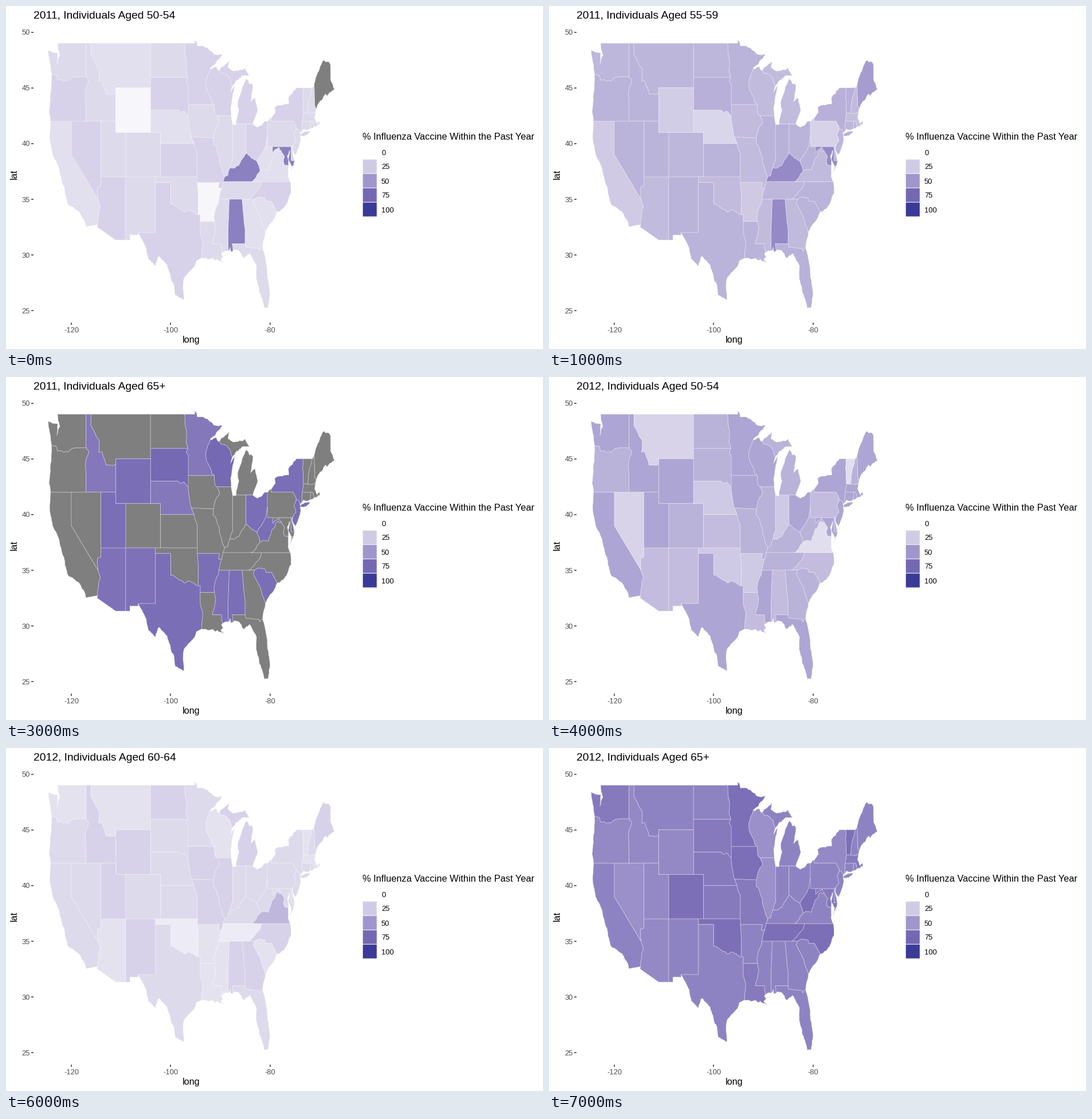
Animation of 937x598 px, one loop 8 s. Source, as a matplotlib script:

```python
import numpy as np
import matplotlib.pyplot as plt
from matplotlib.animation import FuncAnimation
from matplotlib.patches import PathPatch, Rectangle
from matplotlib.path import Path

W, H, DPI = 937, 598, 72  # at 72 dpi one point is one pixel
plt.rcParams["font.family"] = "Liberation Sans"
NA = np.nan
LEVELS = [0, 25, 50, 75, 100]
COLORS = ["#ffffff", "#d0cbe5", "#a096cc", "#7568b3", "#3a3a98"]
SHADES = np.array([plt.matplotlib.colors.to_rgb(c) for c in COLORS])

rng = np.random.default_rng(4)
arcs = []


def to_px(lon, lat):
    return 114 + (lon + 120) * 8.6625, 45.5 + (50 - lat) * 19.42


def ragged(a, b):
    """Midpoint displacement from a up to, but without, b."""
    d = b - a
    size = np.hypot(*d)
    if size < 0.3 or min(abs(d)) < 0.03:
        return [a]
    normal = np.array([-d[1], d[0]]) / size
    mid = (a + b) / 2 + normal * rng.normal(0, 0.07) * min(size, 1)
    return ragged(a, mid) + ragged(mid, b)


def straight(owners, *coords):
    """Border shared by the owners, as west longitude, latitude pairs."""
    points = np.reshape(coords, (-1, 2)) * [-1.0, 1.0]
    arcs.append((owners.split(), points))


def natural(owners, *coords):
    """River or coast through a few key points."""
    straight(owners, *coords)
    p = arcs.pop()[1]
    line = [q for a, b in zip(p, p[1:]) for q in ragged(a, b)]
    arcs.append((owners.split(), np.array(line + [p[-1]])))


def parallel(lat, *stops):
    """Borders along one latitude: longitude, owners, longitude, ..."""
    for w0, owners, w1 in zip(stops[::2], stops[1::2], stops[2::2]):
        straight(owners, w0, lat, w1, lat)


def meridian(lon, *stops):
    """Borders along one longitude: latitude, owners, latitude, ..."""
    for n0, owners, n1 in zip(stops[::2], stops[1::2], stops[2::2]):
        straight(owners, lon, n0, lon, n1)


def gap(a, b):
    return np.hypot(*(a - b))


def rings(state):
    """Chain the borders of a state into closed rings."""
    parts = [line for owners, line in arcs if state in owners]
    done = []
    while parts:
        ring = parts.pop(0)
        while parts:
            options = [(gap(ring[-1], p[0]), i, 1) for i, p in enumerate(parts)]
            options += [(gap(ring[-1], p[-1]), i, -1) for i, p in enumerate(parts)]
            dist, i, step = min(options)
            if gap(ring[-1], ring[0]) <= dist:
                break
            ring = np.vstack([ring, parts.pop(i)[::step][1:]])
        done.append(np.vstack([ring, ring[:1]]))
    return done


# Surveyed grid
parallel(49, 122.75, "WA", 117.05, "ID", 116.05, "MT", 104.05, "ND", 97.2)
parallel(45.94, 104.05, "ND SD", 96.55)
parallel(45, 111.05, "MT WY", 104.05)
parallel(45, 73.35, "VT", 71.5)
parallel(43.5, 96.45, "MN IA", 91.2)
parallel(43, 104.05, "NE SD", 98.5)
parallel(42.5, 90.65, "WI IL", 87.8)
parallel(42, 124.2, "OR CA", 120, "OR NV", 117.05, "ID NV", 114.05, "ID UT", 111.05)
parallel(42, 79.75, "PA NY", 75.35)
parallel(42, 73.5, "CT MA", 71.8, "RI MA", 71.4)
parallel(41.75, 86.8, "MI IN", 84.82, "MI OH", 83.45)
parallel(41, 111.05, "WY UT", 109.05, "WY CO", 104.05, "NE CO", 102.05)
parallel(41, 73.9, "NY", 73.65)
parallel(40, 102.05, "NE KS", 95.3)
parallel(39.72, 80.52, "PA WV", 79.48, "PA MD", 75.75)
parallel(38.45, 75.75, "MD DE", 75.05)
parallel(37, 114.05, "UT AZ", 109.05, "CO NM", 103.05, "CO OK", 102.05, "KS OK", 94.62)
parallel(36.58, 89.45, "KY TN", 83.7, "TN VA", 81.7, "NC VA", 75.87)
parallel(36.5, 103.05, "OK TX", 100)
parallel(36.5, 94.62, "MO AR", 90.15)
parallel(35, 90.3, "MS TN", 88.2, "AL TN", 85.6, "GA TN", 84.3, "GA NC", 83.1)
parallel(33, 94.05, "AR LA", 91.15)
parallel(32, 106.6, "NM TX", 103.05)
parallel(31, 91.6, "LA MS", 89.75)
parallel(31, 87.6, "AL FL", 85)
meridian(117.05, 46, "WA ID", 49)
meridian(117.05, 42, "OR ID", 43.8)
meridian(116.05, 48, "ID MT", 49)
meridian(114.05, 36.2, "NV AZ", 37, "NV UT", 42)
meridian(111.05, 41, "WY UT", 42, "ID WY", 44.5, "MT WY", 45)
meridian(109.05, 31.33, "AZ NM", 37, "UT CO", 41)
meridian(104.05, 41, "NE WY", 43, "SD WY", 45, "MT SD", 45.94, "MT ND", 49)
meridian(103.05, 32, "NM TX", 36.5, "NM OK", 37)
meridian(102.05, 37, "CO KS", 40, "NE CO", 41)
meridian(100, 34.55, "OK TX", 36.5)
meridian(96.45, 42.5, "IA SD", 43.5)
meridian(94.62, 36.5, "MO OK", 37, "KS MO", 39.1)
meridian(94.05, 31.9, "TX LA", 33, "TX AR", 33.6)
meridian(87.53, 39.35, "IL IN", 41.7)
meridian(84.82, 39.1, "IN OH", 41.75)
meridian(80.52, 39.72, "PA WV", 40.64, "OH PA", 42)
meridian(79.75, 42, "PA NY", 42.27)
meridian(75.75, 38.45, "MD DE", 39.72)

# Other straight borders
straight("CA NV", 120, 42, 120, 39, 114.63, 35)
straight("CA", 114.72, 32.72, 117.1, 32.53)
straight("AZ", 114.72, 32.72, 114.8, 32.5, 111.07, 31.33, 109.05, 31.33)
straight("NM", 109.05, 31.33, 108.2, 31.33, 108.2, 31.78, 106.5, 31.78, 106.6, 32)
straight("OK AR", 94.62, 36.5, 94.43, 35.4, 94.48, 33.6)
straight("TX AR", 94.48, 33.6, 94.05, 33.6)
straight("IA MO", 95.85, 40.58, 91.4, 40.5)
straight("MS AL", 88.4, 30.35, 88.45, 31.9, 88.2, 35)
straight("AL GA", 85, 31, 85, 32.3, 85.18, 32.85, 85.6, 35)
straight("SC NC", 83.1, 35, 82.3, 35.2, 81, 35.1, 80.8, 34.8, 79.7, 34.8, 78.55, 33.86)
straight("GA FL", 85, 31, 84.86, 30.7, 82.2, 30.57, 82.05, 30.36, 81.45, 30.72)
straight("PA DE", 75.75, 39.72, 75.42, 39.8)
straight("MD VA", 75.65, 37.95, 75.25, 38.03)
straight("VT MA", 73.25, 42.75, 72.45, 42.73)
straight("NY CT", 73.65, 41, 73.5, 42)
straight("NY MA", 73.5, 42, 73.25, 42.75)
straight("CT RI", 71.8, 42, 71.86, 41.32)
straight("NH MA", 72.45, 42.73, 71.3, 42.7, 70.8, 42.87)
straight("NH ME", 71.1, 45.3, 70.98, 43.4, 70.7, 43.07)

# Rivers and ridges
natural("WA OR", 124, 46.25, 123.1, 46.15, 122.8, 45.7, 121.2, 45.65, 119, 46, 117.05, 46)
natural("OR ID", 117.05, 46, 116.5, 45.6, 117.2, 44.4, 117.05, 43.8)
natural("CA AZ", 114.63, 35, 114.15, 34.3, 114.55, 33.5, 114.72, 32.72)
natural("NV AZ", 114.05, 36.2, 114.7, 36.1, 114.63, 35)
natural("ID MT", 111.05, 44.5, 113, 44.45, 113.9, 45.65, 114.5, 45.6, 114.35, 46.6,
        116.05, 48)
natural("OK TX", 100, 34.55, 98.1, 34.1, 97.2, 33.85, 95.5, 33.9, 94.48, 33.6)
natural("NE SD", 98.5, 43, 97.9, 42.8, 97, 42.75, 96.45, 42.5)
natural("NE IA", 96.45, 42.5, 95.85, 40.58)
natural("NE MO", 95.85, 40.58, 95.3, 40)
natural("KS MO", 95.3, 40, 95.05, 39.5, 94.62, 39.1)
natural("TX LA", 94.05, 31.9, 93.55, 31.2, 93.84, 29.7)
natural("TX", 97.3, 25.97, 99.1, 26.4, 99.5, 27.5, 100.7, 29.1, 102.3, 29.87,
        103.1, 29, 104.5, 29.65, 104.9, 30.6, 106.6, 32)
natural("MN ND", 97.2, 49, 96.8, 46.9, 96.55, 45.94)
natural("MN SD", 96.55, 45.94, 96.85, 45.6, 96.45, 45.3, 96.45, 43.5)
natural("MN WI", 92.05, 46.7, 92.9, 45.6, 92.75, 44.8, 91.2, 43.5)
natural("WI IA", 91.2, 43.5, 91.1, 42.7, 90.65, 42.5)
natural("WI MI", 87.6, 45.1, 88.1, 45.9, 90.4, 46.55)
natural("IL IN", 87.53, 39.35, 87.5, 38.5, 88.05, 37.8)
natural("IL IA", 90.65, 42.5, 90.15, 41.9, 91.05, 41.2, 91.4, 40.5)
natural("IL MO", 91.4, 40.5, 91.4, 39.9, 90.2, 38.8, 90.2, 38.4, 89.15, 37)
natural("IL KY", 89.15, 37, 88.5, 37.1, 88.05, 37.8)
natural("IN KY", 88.05, 37.8, 86.3, 38, 84.82, 39.1)
natural("OH KY", 84.82, 39.1, 83.7, 38.65, 82.6, 38.4)
natural("OH WV", 80.52, 40.64, 80.85, 39.7, 81.8, 38.95, 82.6, 38.4)
natural("KY WV", 82.6, 38.4, 81.97, 37.54)
natural("KY VA", 81.97, 37.54, 83.7, 36.58)
natural("KY MO", 89.45, 36.58, 89.15, 37)
natural("MO TN", 89.45, 36.58, 89.7, 36)
natural("MO AR", 90.15, 36.5, 90.37, 36, 89.7, 36)
natural("AR TN", 89.7, 36, 90.3, 35)
natural("AR MS", 90.3, 35, 91.1, 33.9, 91.15, 33)
natural("LA MS", 91.15, 33, 90.9, 32.4, 91.6, 31)
natural("LA MS", 89.75, 31, 89.55, 30.2)
natural("AL FL", 87.45, 30.3, 87.6, 31)
natural("TN NC", 84.3, 35, 82, 36.1, 81.7, 36.58)
natural("GA SC", 83.1, 35, 83.35, 34.7, 81.9, 33.4, 80.9, 32.05)
natural("PA NY", 75.35, 42, 74.7, 41.36)
natural("PA NJ", 75.42, 39.8, 74.75, 40.2, 75.15, 40.8, 74.7, 41.36)
natural("WV MD", 79.48, 39.72, 79.48, 39.2, 78.2, 39.66, 77.72, 39.32)
natural("WV VA", 77.72, 39.32, 78.35, 39.4, 79.7, 38.5, 80.3, 37.6, 81.97, 37.54)
natural("MD VA", 77.72, 39.32, 77.05, 38.8, 77.3, 38.4, 76.3, 37.95)
natural("NJ NY", 73.9, 41, 74.7, 41.36)
natural("NY VT", 73.25, 42.75, 73.4, 44, 73.35, 45)
natural("VT NH", 71.5, 45, 72.05, 44.1, 72.45, 42.73)
natural("RI MA", 71.4, 42, 71.12, 41.5)

# Coasts, lake shores and the northeastern frontier
natural("WA", 124, 46.25, 124.6, 47.9, 124.7, 48.4, 122.75, 48.15, 122.9, 47.1,
        122.3, 47.9, 122.75, 49)
natural("OR", 124.2, 42, 124.5, 42.85, 124, 46.25)
natural("CA", 117.1, 32.53, 117.3, 33, 118.4, 33.85, 120.6, 34.5, 121.9, 36.6,
        122.5, 37.8, 123.75, 38.95, 124.35, 40.4, 124.2, 42)
natural("TX", 93.84, 29.7, 94.8, 29.5, 97.3, 27.9, 97.5, 27, 97.3, 25.97)
natural("LA", 89.55, 30.2, 89.8, 30.1, 89.4, 29.8, 89.9, 29.6, 89.2, 29.2,
        90.2, 29.45, 91.6, 29.7, 92.3, 29.6, 93.84, 29.7)
natural("MS", 89.55, 30.2, 88.4, 30.35)
natural("AL", 88.4, 30.35, 88, 30.7, 87.85, 30.25, 87.45, 30.3)
natural("FL", 81.45, 30.72, 80.55, 28.4, 80.03, 26.8, 80.35, 25.25, 81.1, 25.2,
        81.85, 26.45, 82.75, 27.85, 82.7, 29, 84, 30.1, 85.3, 29.7, 86.3, 30.4,
        87.45, 30.3)
natural("GA", 80.9, 32.05, 81.45, 30.72)
natural("SC", 78.55, 33.86, 79.3, 33.1, 80.9, 32.05)
natural("NC", 75.87, 36.58, 75.75, 35.5, 76.5, 34.7, 77.9, 33.95, 78.55, 33.86)
natural("VA", 76.3, 37.95, 76.35, 37.1, 75.87, 36.58)
natural("VA", 75.25, 38.03, 75.95, 37.15, 75.65, 37.95)
natural("MD", 76.3, 37.95, 76.5, 38.9, 76, 39.4, 76.3, 38.6, 75.65, 37.95)
natural("MD", 75.25, 38.03, 75.05, 38.45)
natural("DE", 75.42, 39.8, 75.6, 39.5, 75.4, 39.1, 75.05, 38.45)
natural("NJ", 75.42, 39.8, 75.5, 39.5, 74.9, 38.95, 74.1, 39.8, 73.9, 41)
natural("NY", 74, 40.6, 73.7, 40.87, 72.3, 41.1, 71.9, 41.05, 72.5, 40.82, 74, 40.6)
natural("NY", 79.75, 42.27, 78.9, 42.8, 79.05, 43.27, 76.2, 43.55, 76.3, 44.1,
        74.7, 45, 73.35, 45)
natural("CT", 71.86, 41.32, 73.65, 41)
natural("RI", 71.12, 41.5, 71.86, 41.32)
natural("MA", 70.8, 42.87, 71, 42.3, 70.5, 41.78, 70, 42, 69.95, 41.7, 71.12, 41.5)
natural("NH", 71.5, 45, 71.1, 45.3)
natural("NH", 70.7, 43.07, 70.8, 42.87)
natural("ME", 71.1, 45.3, 70, 46.7, 69.23, 47.46, 68.3, 47.35, 67.8, 47.07,
        67.78, 45.7, 67, 44.85, 68.5, 44.25, 68.8, 44.45, 70.2, 43.6, 70.7, 43.07)
natural("PA", 80.52, 42, 79.75, 42.27)
natural("OH", 83.45, 41.75, 82.5, 41.45, 80.52, 42)
natural("IN", 87.53, 41.7, 86.8, 41.75)
natural("IL", 87.8, 42.5, 87.53, 41.7)
natural("MI", 86.8, 41.75, 86.25, 43, 86.5, 43.7, 85.6, 45, 84.8, 45.8, 83.4, 45.2,
        83.9, 43.75, 82.95, 44.07, 82.45, 43, 83.45, 41.75)
natural("MI", 90.4, 46.55, 88.2, 47.45, 88.45, 46.8, 87.4, 46.5, 85, 46.77,
        84.1, 46.1, 85.5, 46.1, 86.7, 45.7, 87.6, 45.1)
natural("WI", 87.8, 42.5, 87.9, 43.2, 87.5, 44.4, 87.1, 45.3, 87.95, 44.6, 87.6, 45.1)
natural("WI", 92.05, 46.7, 90.8, 46.9, 90.4, 46.55)
natural("MN", 97.2, 49, 95.15, 49, 95.15, 49.38, 94.6, 48.75, 92.9, 48.6,
        91.4, 48.07, 89.6, 48, 92.05, 46.7)

STATES = sorted({s for owners, _ in arcs for s in owners})


def rates(usual, groups):
    """One rate for most states, others for the groups that stand out."""
    special = {s: rate for rate, names in groups.items() for s in names.split()}
    return np.array([special.get(s, usual) for s in STATES])


young_11 = rates(18, {4.5: "WY AR", 15.5: "NE VA WV CA GA SC MT", 62: "KY AL MD",
                      21.5: "OR NV AZ SD KS MO MI OH NC TX NY MN WI", NA: "ME"})
older_11 = rates(51, {25: "NE PA", 35: "CA", 44: "WY AZ WI MI MO MA", 57: "FL SC WV VT IN",
                      47: "IA AR OK ME NH MS", 54: "ID MT UT NM SD LA IL NY"})
senior_11 = rates(NA, {66.5: "ID NE MN", 70: "AZ NM MS", 74.5: "SD WI",
                       72: "WY UT TX AR AL SC WV OH NY NJ DE"})
young_12 = rates(37, {16: "VT VA", 21: "NV MT", 26: "NE OK AR IN",
                      32: "AZ NM LA NC PA AL KS",
                      43: "WA ID WY UT TX MN IA WI OH MS FL NY NJ ME MA MD CT RI CA"})
older_12 = rates(18, {9.5: "OK TN", 14: "WA MT AZ AR LA WI MS SC VT MA", 34: "VA",
                      21.5: "ID WY UT ND IA IL MI AL GA NC ME MO NM"})
senior_12 = rates(60.5, {53: "NV WI IL", 57: "ID UT WY AZ OR NY",
                         65: "SD NE KS MO LA WA MA MD",
                         71: "CO IA TN NC WV VT OK MN"})
mid_11 = np.nanmean([young_11, older_11], axis=0)
steady = np.isin(STATES, ["WA", "OR", "CA", "TX", "FL", "LA"])
mid_12 = np.where(steady, young_12, (young_12 + 38) / 2)

AGES = ["50-54", "55-59", "60-64", "65+"]
RATES = [young_11, mid_11, older_11, senior_11,
         young_12, mid_12, older_12, senior_12]


def shade(rate):
    if np.isnan(rate):
        return "#7f7f7f"
    return tuple(np.interp(rate, LEVELS, channel) for channel in SHADES.T)


fig = plt.figure(figsize=(W / DPI, H / DPI), dpi=DPI, facecolor="white")
ax = fig.add_axes([0, 0, 1, 1])
ax.set(xlim=(0, W), ylim=(H, 0))
ax.axis("off")


def label(x, y, text, size, color="black", ha="left"):
    return ax.text(x, y, text, size=size, color=color, ha=ha, va="baseline")


def tick(xs, ys):
    ax.plot(xs, ys, color="#333333", lw=1.5, solid_capstyle="butt")


title = label(48, 22, "", 19.25)
for lat in range(25, 51, 5):
    y = to_px(0, lat)[1]
    tick([44, 48.3], [y, y])
    label(42, y + 4.7, str(lat), 12.9, "#4d4d4d", "right")
for lon in (-120, -100, -80):
    x = to_px(lon, 0)[0]
    tick([x, x], [551.5, 555.8])
    label(x, 568.7, str(lon), 12.9, "#4d4d4d", "center")
label(323, 587, "long", 16.3, ha="center")
ax.text(14, 293, "lat", size=16.3, rotation=90, ha="center", va="center")

label(622, 232.6, "% Influenza Vaccine Within the Past Year", 16.35)
for k, level in enumerate(LEVELS):
    ax.add_patch(Rectangle((622.2, 242.2 + 25 * k), 25, 25, fc=shade(level),
                           ec="white", lw=0.8, snap=False))
    label(655, 259.5 + 25 * k, str(level), 12.9)

shapes = []
for state in STATES:
    outline = [Path(np.column_stack(to_px(*r.T)), closed=True) for r in rings(state)]
    patch = PathPatch(Path.make_compound_path(*outline), ec=(1, 1, 1, 0.35),
                      lw=0.9, joinstyle="round", snap=False)
    shapes.append(ax.add_patch(patch))


def update(i):
    title.set_text(f"{2011 + i // 4}, Individuals Aged {AGES[i % 4]}")
    for patch, rate in zip(shapes, RATES[i]):
        patch.set_facecolor(shade(rate))
    return [title, *shapes]


anim = FuncAnimation(fig, update, frames=8, interval=1000, repeat=True,
                     repeat_delay=0, blit=False)
plt.show()
```
